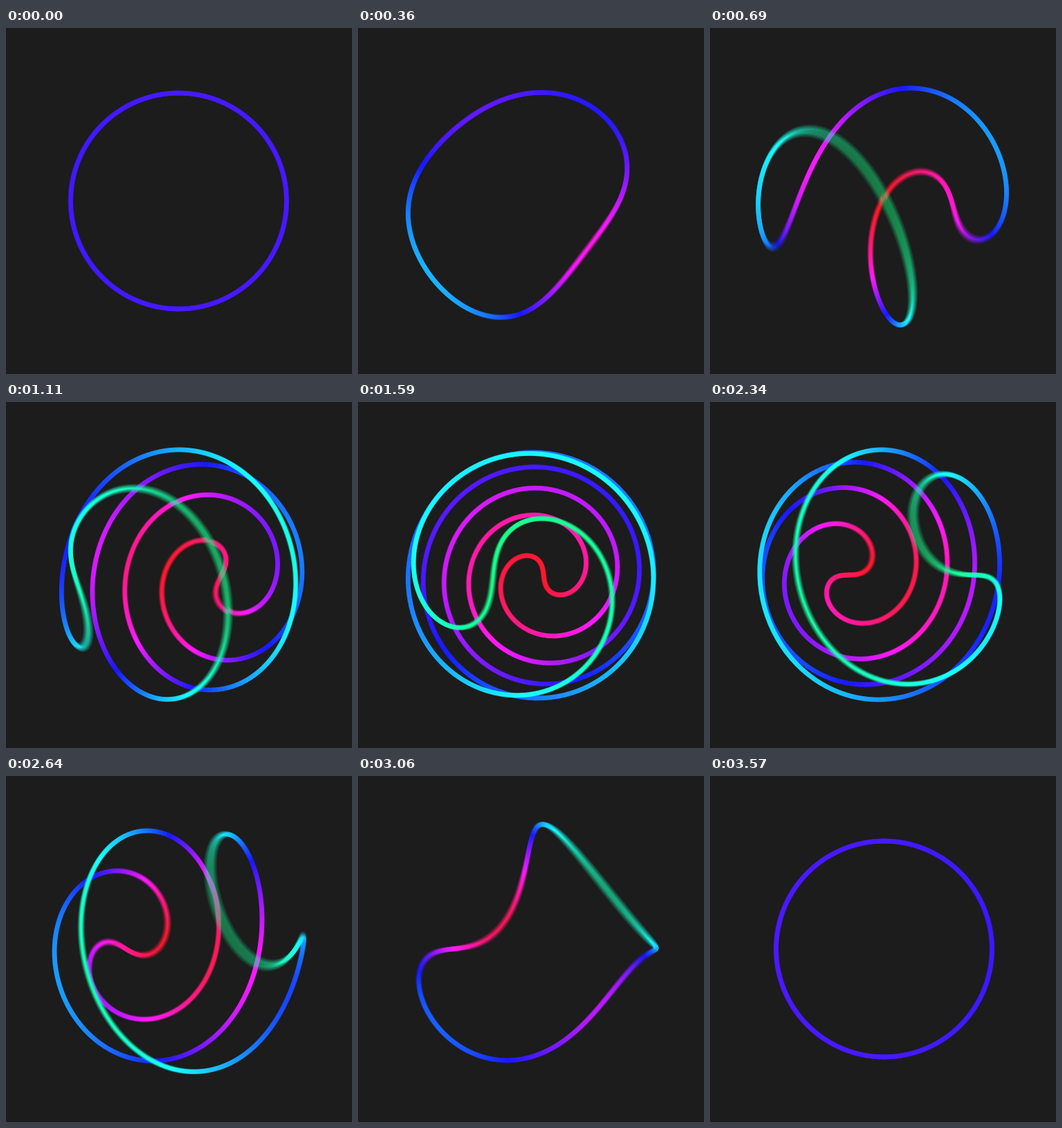
An HTML page with a canvas for the animation above (3600 ms loop, 500x500 px).

```html
<!DOCTYPE html>
<html lang="en">
<head>
<meta charset="utf-8">
<title>Twisting ring</title>
<style>
  html, body { margin: 0; width: 100%; height: 100%; overflow: hidden; background: #1c1c1c; }
  canvas { display: block; width: 100vw; height: 100vh; }
</style>
</head>
<body>
<canvas id="stage" width="500" height="500"></canvas>
<script>
const SIZE = 500, CENTER = 250;
const FRAME_MS = 30, FRAMES = 120;
const RADIUS = 156, CAMERA = 1.97;      // camera distance in sphere radii
const MAX_TWIST = 3 * Math.PI;
const SEGMENTS = 900, LINE_WIDTH = 6.8;
const SAMPLES = 10, SHUTTER = 0.6;      // motion blur
const BACKGROUND = '#1c1c1c';

const stage = document.getElementById('stage').getContext('2d');
const layer = document.createElement('canvas');
layer.width = layer.height = SIZE;
const ink = layer.getContext('2d');

const smootherstep = p => p * p * p * (p * (6 * p - 15) + 10);

// A great circle through the axis, twisted around it and turned about the vertical.
function ringPoints(phase) {
  const turn = Math.PI * phase;
  const cos = Math.cos(turn), sin = Math.sin(turn);
  const twist = MAX_TWIST * smootherstep(1 - Math.abs(1 - 2 * phase));
  const points = [];
  for (let i = 0; i < SEGMENTS; i++) {
    const a = 2 * Math.PI * i / SEGMENTS;
    const along = Math.cos(a), out = Math.sin(a);
    const y = out * Math.cos(twist * along);
    const side = -out * Math.sin(twist * along);
    const x = along * cos + side * sin;
    const z = side * cos - along * sin;
    const scale = RADIUS * CAMERA / (CAMERA - z);
    points.push({ x: CENTER + x * scale, y: CENTER + y * scale, z });
  }
  return points;
}

function drawRing(phase) {
  ink.fillStyle = BACKGROUND;
  ink.fillRect(0, 0, SIZE, SIZE);
  ink.lineWidth = LINE_WIDTH;
  const points = ringPoints(phase);
  const segments = points.map((from, i) => {
    const to = points[(i + 1) % SEGMENTS];
    return { from, to, z: (from.z + to.z) / 2 };
  });
  segments.sort((a, b) => a.z - b.z);
  for (const { from, to, z } of segments) {
    const dx = to.x - from.x, dy = to.y - from.y;
    const overlap = 0.5 / (Math.hypot(dx, dy) || 1);
    ink.strokeStyle = `hsl(${252 - 104 * z}, 100%, 55%)`;
    ink.beginPath();
    ink.moveTo(from.x - dx * overlap, from.y - dy * overlap);
    ink.lineTo(to.x + dx * overlap, to.y + dy * overlap);
    ink.stroke();
  }
}

function drawFrame(frame) {
  for (let s = 0; s < SAMPLES; s++) {
    drawRing((frame + SHUTTER * s / SAMPLES) / FRAMES);
    stage.globalAlpha = 1 / (s + 1);    // running average of the samples
    stage.drawImage(layer, 0, 0);
  }
}

let shown = -1;
const start = performance.now();

function tick() {
  const elapsed = Math.max(0, performance.now() - start);
  const frame = Math.floor(elapsed / FRAME_MS) % FRAMES;
  if (frame !== shown) {
    shown = frame;
    drawFrame(frame);
  }
  requestAnimationFrame(tick);
}
tick();
</script>
</body>
</html>
```
